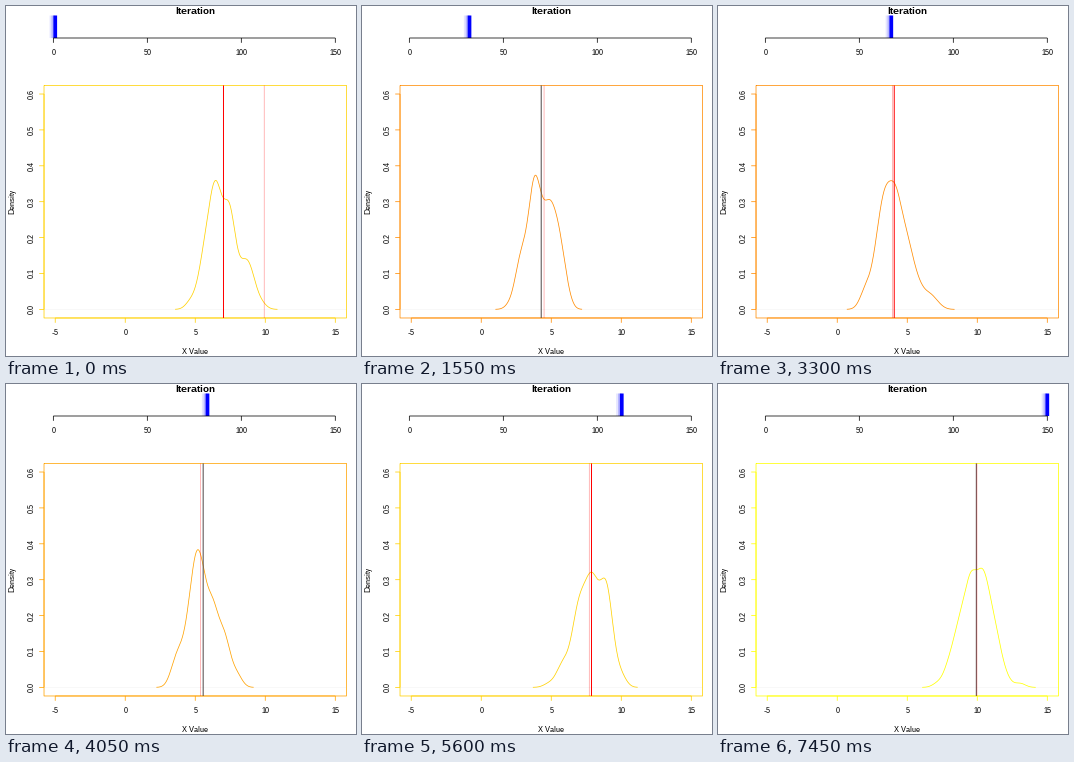
Recreate the animation shown at these times as a matplotlib script. Size 350 by 350 pixels, loop 7.5 s.

```python
import colorsys

import numpy as np
import matplotlib.pyplot as plt
from matplotlib.animation import FuncAnimation
from matplotlib.patches import Rectangle

SIZE, DPI, STEPS, INTERVAL = 350, 100, 150, 50
PT = 72 / DPI                       # points per pixel
LINE = 0.75 * PT
LEFT, RIGHT, TOP, BOTTOM = 38.02, 340.5, 79.4, 311.98
BAR_TOP, BAR_BOTTOM, BAR_WIDTH = 9.5, 32, 3.75
TICK = 4.8

plt.rcParams["font.family"] = "Liberation Sans"
plt.rcParams["text.hinting"] = "native"
plt.rcParams["text.hinting_factor"] = 1


def scale(low, high, start, end):
    """Map low..high, padded by 4 % on both sides, to start..end."""
    pad = .04 * (high - low)
    unit = (end - start) / (high - low + 2 * pad)
    return lambda v: start + (v - low + pad) * unit


sx = scale(-5, 15, LEFT, RIGHT)
sy = scale(0, .6, BOTTOM, TOP)
bar_x = scale(1, STEPS, LEFT, RIGHT)


def drift(i):
    return np.sqrt(abs(i - 51))


def density(sample):
    """Gaussian kernel estimate with the rule-of-thumb bandwidth."""
    q1, q3 = np.percentile(sample, [25, 75])
    bw = .9 * min(sample.std(ddof=1), (q3 - q1) / 1.34) * len(sample) ** -.2
    x = np.linspace(sample.min() - 3 * bw, sample.max() + 3 * bw, 300)
    bells = np.exp(-.5 * ((x[:, None] - sample) / bw) ** 2)
    return x, bells.mean(axis=1) / (bw * np.sqrt(2 * np.pi))


def heat(value):
    """Red at -1 to yellow at 10, in whole steps."""
    return colorsys.hsv_to_rgb((int(value) + 2) / 66, 1, 1)


rng = np.random.default_rng(51)
samples = [rng.normal(drift(i), 1, 100) for i in range(1, STEPS + 1)]
means = [s.mean() for s in samples]
curves = [density(s) for s in samples]

fig = plt.figure(figsize=(SIZE / DPI, SIZE / DPI), dpi=DPI, facecolor="white")
ax = fig.add_axes([0, 0, 1, 1])
ax.set(xlim=(0, SIZE), ylim=(SIZE, 0))
ax.axis("off")


def line(xs, ys, color="black", width=LINE, **kw):
    return ax.plot(xs, ys, color=color, lw=width, snap=False,
                   solid_capstyle="butt", **kw)[0]


def label(x, y, text, size=8, **kw):
    ax.text(x, y, text, fontsize=size * PT, ha="center", va="baseline",
            rotation_mode="anchor", **kw)


# Progress axis
label((LEFT + RIGHT) / 2, 8, "Iteration", 9.6, weight="bold")
line([bar_x(0), bar_x(STEPS)], [BAR_BOTTOM] * 2, zorder=4)
for t in range(0, STEPS + 1, 50):
    line([bar_x(t)] * 2, [BAR_BOTTOM, BAR_BOTTOM + TICK], zorder=4)
    label(bar_x(t), 49, str(t))

bars = [
    ax.add_patch(Rectangle((0, BAR_TOP), BAR_WIDTH, BAR_BOTTOM - BAR_TOP,
                           fc="blue", ec="none", alpha=alpha, snap=False,
                           zorder=3))
    for alpha in (1, .2, .1)
]

# Density panel
frame = [
    line([LEFT, RIGHT, RIGHT, LEFT, LEFT], [TOP, TOP, BOTTOM, BOTTOM, TOP]),
    line([sx(-5), sx(15)], [BOTTOM] * 2),
    line([LEFT] * 2, [sy(0), sy(.6)]),
]
for t in range(-5, 16, 5):
    frame.append(line([sx(t)] * 2, [BOTTOM, BOTTOM + TICK]))
    label(sx(t), 329, str(t))
for t in np.arange(7) / 10:
    frame.append(line([LEFT - TICK, LEFT], [sy(t)] * 2))
    label(27.5, sy(t), f"{t:.1f}", rotation=90)
label((LEFT + RIGHT) / 2, 348, "X Value")
label(8, (TOP + BOTTOM) / 2, "Density", rotation=90)

line([LEFT, RIGHT], [sy(0)] * 2, "#bebebe", .1 * PT)
curve = line([], [], zorder=5)
mean_line = line([], [], width=PT, zorder=6)
last_line = line([], [], "red", PT, alpha=.275, zorder=7)


def update(n):
    for k, bar in enumerate(bars):
        bar.set_x(bar_x(n + 1 - k) - BAR_WIDTH / 2)
    color = heat(drift(n + 1))
    for part in frame + [curve]:
        part.set_color(color)
    x, d = curves[n]
    curve.set_data(sx(x), sy(d))
    # The mean flickers between red and grey; the previous one lingers
    mean_line.set_color("#504848" if n % 2 else "red")
    for artist, mean in ((mean_line, means[n]), (last_line, means[n - 1])):
        artist.set_data([sx(mean)] * 2, [TOP, BOTTOM])
    return [*bars, *frame, curve, mean_line, last_line]


anim = FuncAnimation(fig, update, frames=STEPS, interval=INTERVAL,
                     repeat=True, repeat_delay=0)
plt.show()
```
